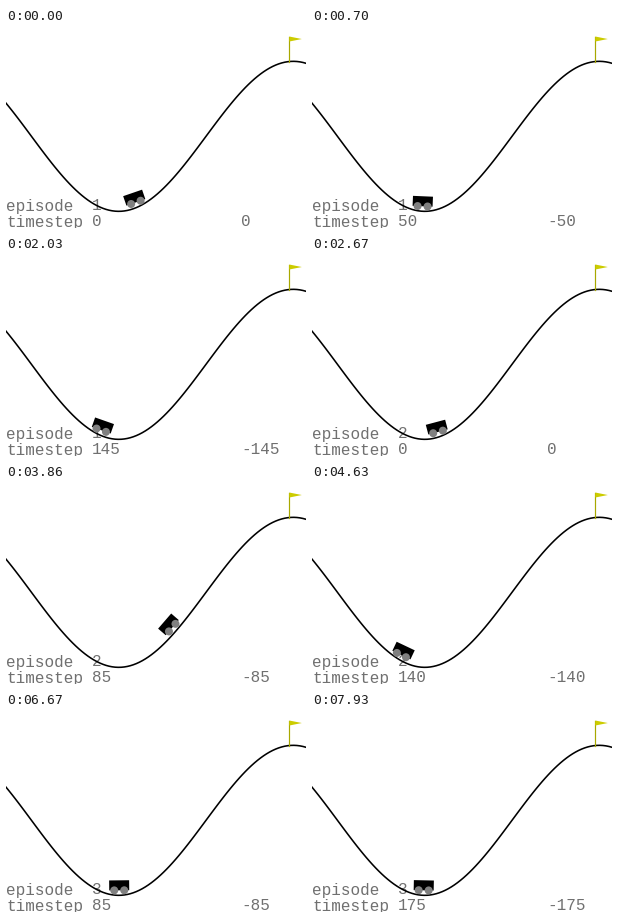
A matplotlib script that plays this animation: 300x200 px, repeating every 8000 ms.

```python
import numpy as np
import matplotlib.pyplot as plt
from matplotlib.animation import FuncAnimation
from matplotlib.patches import Circle, Polygon

W, H = 300, 200
SCALE = W / 1.8            # world spans -1.2 .. 0.6
VALLEY = (1.2 - np.pi / 6) * SCALE
PT = 0.72                  # one pixel in points at 100 dpi
LOOP, TICK, HOLD = 8000, 20, 70
STEPS_PER_POSE = 5
HALF_SWING = 36            # steps between turns of a small free swing

# Each episode: start in ms, last step, turning points of the car (step, x)
rocking = [(HALF_SWING * i, VALLEY + 1.3 * (-1) ** i) for i in range(6)]
EPISODES = [
    (0, 175, [(0, 131.5), (38, 94.5), (79, 175), (126, 32.6), (175, 268)]),
    (2670, 185, [(0, 127.3), (43, 96), (85, 170), (121, 49.7), (185, 288)]),
    (5480, 175, rocking),
]


def to_world(x):
    return x / SCALE - 1.2


def hill(x):
    """Height of the track, in pixels from the bottom."""
    return (np.sin(3 * to_world(x)) * 0.45 + 0.55) * SCALE


def swing(turns, step, last):
    """Cosine swing between turns; the winning climb ends still moving."""
    for (s0, x0), (s1, x1) in zip(turns, turns[1:]):
        if step <= s1:
            break
    arc = np.pi * (0.85 if s1 == last else 1)
    u = (step - s0) / (s1 - s0)
    return x0 + (x1 - x0) * (1 - np.cos(arc * u)) / (1 - np.cos(arc))


def place(points, x):
    """Turn local car points along the slope and move them onto the track."""
    a = np.cos(3 * to_world(x))
    c, s = np.cos(a), np.sin(a)
    return np.array(points) @ np.array([[c, s], [-s, c]]) + (x, hill(x))


BODY = [(-10, 5), (-10, 15), (10, 15), (10, 5)]
AXLES = [(5, 5), (-5, 5)]

fig = plt.figure(figsize=(3, 2), dpi=100, facecolor="white")
ax = fig.add_axes([0, 0, 1, 1])
ax.set(xlim=(0, W), ylim=(0, H))
ax.axis("off")

xs = np.linspace(0, W, 100)
ax.plot(xs, hill(xs), color="black", lw=1.6 * PT, zorder=1)

flag_x = 1.7 * SCALE
flag_y = hill(flag_x)
top = flag_y + 25
ax.plot([flag_x, flag_x], [flag_y, top], color="#a8a800", lw=1.2 * PT, zorder=2)
ax.add_patch(Polygon([(flag_x, top), (flag_x, top - 5), (flag_x + 12.5, top - 2.5)],
                     fc="#cccc00", lw=0, zorder=2))

body = ax.add_patch(Polygon(BODY, fc="black", lw=0, zorder=3))
wheels = [ax.add_patch(Circle(p, 4, fc="#808080", lw=0, zorder=4)) for p in AXLES]


def label(x, y, text=""):
    return ax.text(x, y, text, family="Liberation Mono", size=16 * PT,
                   color="#707070", ha="left", va="baseline", zorder=0)


label(0, 17.5, "episode")
label(0, 1.5, "timestep")
episode_text = label(86, 18.5)
step_text = label(86, 2.5)
score_text = label(235, 2.5)


def draw(i):
    t = i * TICK + TICK // 2
    number = sum(t >= start for start, _, _ in EPISODES)
    start, last, turns = EPISODES[number - 1]
    step = min((t - start) // HOLD * STEPS_PER_POSE, last)
    x = swing(turns, step, last)

    body.set_xy(place(BODY, x))
    for wheel, centre in zip(wheels, place(AXLES, x)):
        wheel.center = centre
    episode_text.set_text(str(number))
    step_text.set_text(str(step))
    score_text.set_text(str(-step))
    return [body, *wheels, episode_text, step_text, score_text]


anim = FuncAnimation(fig, draw, frames=LOOP // TICK, interval=TICK,
                     repeat=True, repeat_delay=0, blit=False)
plt.show()
```
